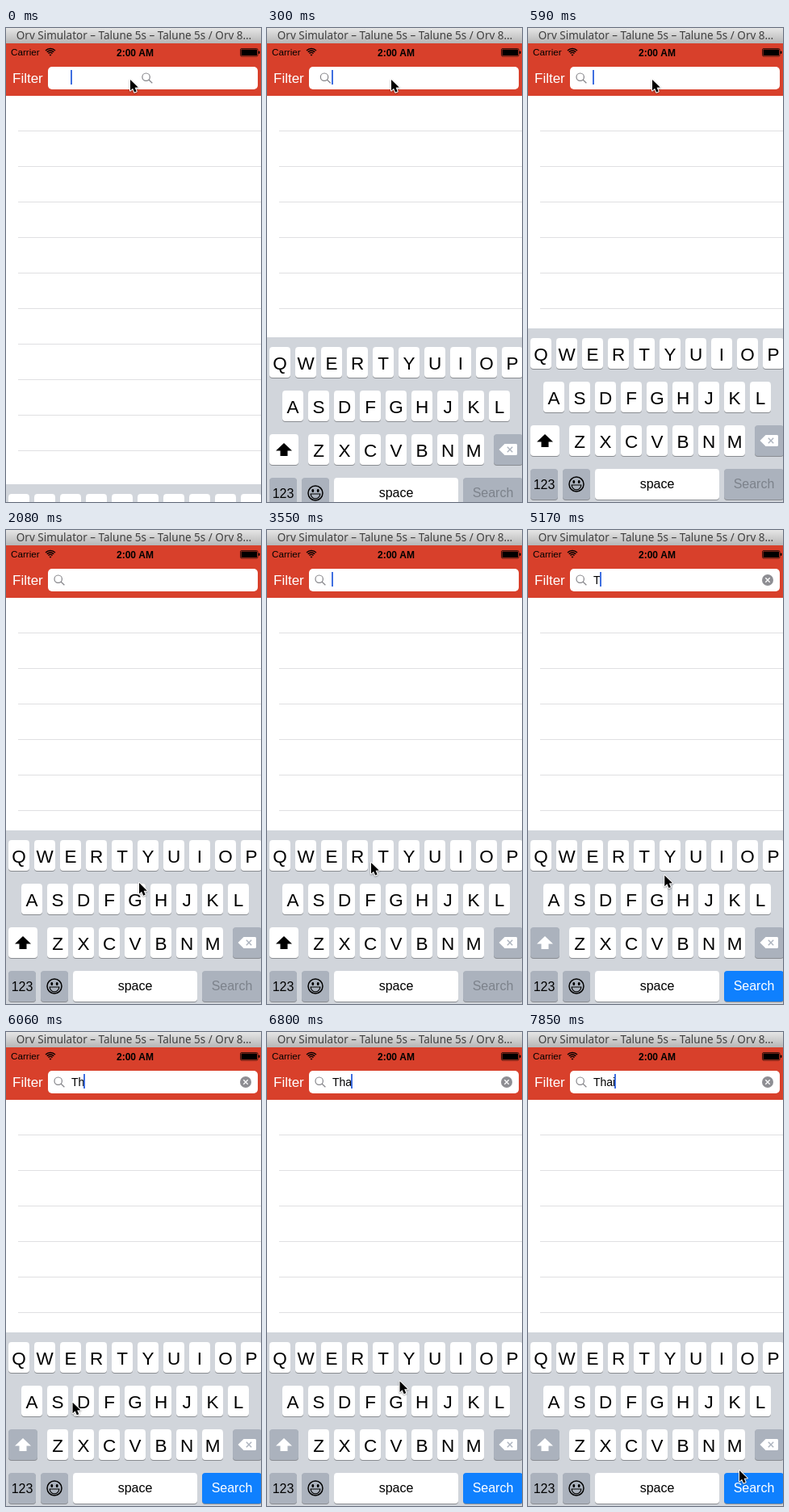
An HTML page with a canvas that plays this animation: 316 by 587 pixels, repeating every 8 s.

```html
<!DOCTYPE html>
<html lang="en">
<head>
<meta charset="utf-8">
<title>Search keyboard</title>
<style>
html, body { margin: 0; width: 100%; height: 100%; overflow: hidden; background: #fff; }
canvas { display: block; width: 316px; height: 587px; }
</style>
</head>
<body>
<canvas id="stage" width="316" height="587"></canvas>
<script>
const ctx = document.getElementById('stage').getContext('2d');
const W = 316, H = 587, LOOP = 8000, STEP = LOOP / 54;
const SANS = '"Liberation Sans", Arial, sans-serif';
const RED = '#d8402b', BOARD = '#d1d5db', GREY = '#abb2bd', BLUE = '#0f80fe';

// Key presses: letter typed, key, press and release times
const presses = [
  { out: 'T', key: 'T', down: 4425, up: 4575 },
  { out: 'h', key: 'H', down: 5420, up: 5590 },
  { out: 'a', key: 'A', down: 6130, up: 6290 },
  { out: 'i', key: 'I', down: 7090, up: 7260 }
];

// Pointer path: time, x, y
const path = [
  [0, 154, 64], [1030, 154, 64], [1180, 172, 300], [1330, 174, 403],
  [1500, 174, 403], [1640, 178, 420], [1900, 171, 446], [2075, 165, 437],
  [2660, 152, 446], [2960, 129, 450], [3120, 129, 450], [3550, 129, 412],
  [4290, 129, 412], [4440, 140, 408], [4740, 143, 409], [5170, 181, 436],
  [5450, 189, 458], [5620, 187, 458], [6080, 30, 459], [6260, 32, 459],
  [6510, 110, 445], [6800, 211, 422], [7050, 240, 406], [7290, 240, 408],
  [7700, 250, 513], [7850, 262, 543], [8000, 262, 543]
];

function pointerAt(t) {
  const i = Math.max(1, path.findIndex(p => p[0] > t));
  const [t0, x0, y0] = path[i - 1], [t1, x1, y1] = path[i];
  const k = (t - t0) / (t1 - t0);
  return [x0 + (x1 - x0) * k, y0 + (y1 - y0) * k];
}

// Remaining share of the critically damped entrance
function remaining(t) {
  const a = 14 * (t + 38) / 1000;
  return t > 560 ? 0 : (1 + a) * Math.exp(-a);
}

function box(x, y, w, h, r, color) {
  ctx.fillStyle = color;
  ctx.beginPath();
  ctx.roundRect(x, y, w, h, r);
  ctx.fill();
}

function text(s, x, y, size, color, align = 'center', weight = '', family = SANS) {
  ctx.font = `${weight} ${size}px ${family}`;
  ctx.textAlign = align;
  ctx.fillStyle = color;
  ctx.fillText(s, x, y);
}

function poly(points, color) {
  ctx.fillStyle = color;
  ctx.beginPath();
  points.forEach(([x, y]) => ctx.lineTo(x, y));
  ctx.closePath();
  ctx.fill();
}

function stroke(color, width, draw) {
  ctx.strokeStyle = color;
  ctx.lineWidth = width;
  ctx.beginPath();
  draw();
  ctx.stroke();
}

function cross(x, y, r, color, width) {
  stroke(color, width, () => {
    ctx.moveTo(x - r, y - r); ctx.lineTo(x + r, y + r);
    ctx.moveTo(x + r, y - r); ctx.lineTo(x - r, y + r);
  });
}

function titleBar() {
  const g = ctx.createLinearGradient(0, 0, 0, 19);
  g.addColorStop(0, '#e6e6e6');
  g.addColorStop(1, '#b6b6b6');
  ctx.fillStyle = g;
  ctx.fillRect(0, 0, W, 19);
  text('Orv Simulator – Talune 5s – Talune 5s / Orv 8…', 158.5, 14, 13.5,
    '#404040', 'center', '', '"Noto Sans", sans-serif');
}

function statusBar() {
  text('Carrier', 6, 34, 11.7, '#000', 'left');
  text('2:00 AM', 160, 34.5, 12, '#000', 'center', 'bold');
  for (const r of [3.6, 6, 8.4]) {
    stroke('#000', 1.5, () => ctx.arc(55, 34, r, -Math.PI * 0.75, -Math.PI * 0.25));
  }
  poly([[53.4, 32.7], [56.6, 32.7], [55, 34.7]], '#000');
  stroke('#000', 0.7, () => ctx.roundRect(290.5, 25.5, 21.5, 9.5, 1.5));
  box(291.5, 26.5, 19.5, 7.5, 0.5, '#000');
  box(312.8, 28.5, 1.6, 3.5, 0.8, '#000');
}

function searchBar(t, p) {
  text('Filter', 8, 68, 17, '#fff', 'left');
  box(52, 48, 260, 28, 5, '#fff');

  const x = 66 + 121 * p;
  stroke('#85858a', 1.2, () => {
    ctx.arc(x - 1.3, 60.7, 4.7, 0, 7);
    ctx.moveTo(x + 2.2, 64.2);
    ctx.lineTo(x + 6.4, 68.2);
  });

  const done = presses.filter(k => t >= k.up);
  const value = done.map(k => k.out).join('');
  text(value, 81, 67, 14, '#000', 'left');
  const since = t - (done.length ? done[done.length - 1].up + 200 : 250);
  if (since < 0 || since % 1000 < 550) {
    ctx.fillStyle = '#3f6fe0';
    ctx.fillRect(80 + Math.round(ctx.measureText(value).width), 52, 2, 18);
  }
  if (value) {
    box(290, 55, 14, 14, 7, '#8e8e93');
    cross(297, 62, 2.7, '#fff', 1.3);
  }
  return value;
}

function key(x, y, w, color) {
  box(x, y + 1, w, 38, 4, '#898c91');
  box(x, y, w, 38, 4, color);
}

function balloon(x, y, label) {
  ctx.save();
  ctx.shadowColor = 'rgba(0,0,0,.4)';
  ctx.shadowBlur = 3;
  ctx.fillStyle = '#fff';
  ctx.beginPath();
  ctx.moveTo(x, y + 34);
  ctx.lineTo(x, y + 9);
  ctx.bezierCurveTo(x, y - 1, x - 13, y - 1, x - 13, y - 13);
  ctx.lineTo(x - 13, y - 45);
  ctx.quadraticCurveTo(x - 13, y - 54, x - 4, y - 54);
  ctx.lineTo(x + 30, y - 54);
  ctx.quadraticCurveTo(x + 39, y - 54, x + 39, y - 45);
  ctx.lineTo(x + 39, y - 13);
  ctx.bezierCurveTo(x + 39, y - 1, x + 26, y - 1, x + 26, y + 9);
  ctx.lineTo(x + 26, y + 34);
  ctx.quadraticCurveTo(x + 26, y + 38, x + 22, y + 38);
  ctx.lineTo(x + 4, y + 38);
  ctx.quadraticCurveTo(x, y + 38, x, y + 34);
  ctx.fill();
  ctx.restore();
  text(label, x + 13, y - 15, 34, '#000');
}

function smiley(x, y) {
  stroke('#000', 1.5, () => ctx.arc(x, y, 9, 0, 7));
  box(x - 4.5, y - 5, 2.6, 4, 1.3, '#000');
  box(x + 1.9, y - 5, 2.6, 4, 1.3, '#000');
  stroke('#000', 1.2, () => {
    ctx.arc(x, y + 1, 5.8, 0, Math.PI);
    ctx.closePath();
  });
}

function keyboard(t, top, typed) {
  ctx.fillStyle = BOARD;
  ctx.fillRect(0, top, W, H - top);
  const rows = [['QWERTYUIOP', 3], ['ASDFGHJKL', 19], ['ZXCVBNM', 51]];
  const held = presses.find(k => t >= k.down && t < k.up);
  let pop;
  rows.forEach(([letters, left], r) => {
    const y = top + 12 + r * 54;
    [...letters].forEach((c, i) => {
      const x = left + i * 32;
      key(x, y, 26, '#fff');
      text(c, x + 13, y + 27.5, 22.5, '#000');
      if (held && held.key === c) pop = [x, y, c];
    });
  });

  const y3 = top + 120, y4 = top + 174;
  key(3, y3, 36, typed ? GREY : '#fff');
  poly([[21, y3 + 11], [31, y3 + 20.5], [25.5, y3 + 20.5], [25.5, y3 + 27],
    [16.5, y3 + 27], [16.5, y3 + 20.5], [11, y3 + 20.5]], typed ? '#fff' : '#000');

  key(281, y3, 36, GREY);
  poly([[287.5, y3 + 19], [294.5, y3 + 12], [309, y3 + 12], [310, y3 + 13],
    [310, y3 + 25], [309, y3 + 26], [294.5, y3 + 26]], '#fff');
  cross(301, y3 + 19, 3.2, GREY, 1.4);

  key(3, y4, 34, GREY);
  text('123', 20, y4 + 25, 16, '#000');
  key(43, y4, 34, GREY);
  smiley(60, y4 + 19);
  key(83, y4, 154, '#fff');
  text('space', 160, y4 + 24, 16, '#000');
  key(243, y4, 74, typed ? BLUE : GREY);
  text('Search', 280, y4 + 24, 16, typed ? '#fff' : '#7c828b');
  if (pop) balloon(...pop);
}

function pointer([x, y]) {
  const shape = [[0, 0], [0, 13.5], [3.1, 10.7], [5.2, 15.6], [7.7, 14.5], [5.6, 9.8], [9.8, 9.6]]
    .map(([a, b]) => [x + a, y + b]);
  ctx.save();
  ctx.lineJoin = 'round';
  ctx.shadowColor = 'rgba(0,0,0,.35)';
  ctx.shadowBlur = 2;
  ctx.shadowOffsetY = 1;
  stroke('#fff', 2, () => {
    shape.forEach(p => ctx.lineTo(...p));
    ctx.closePath();
  });
  ctx.restore();
  poly(shape, '#000');
}

function draw(now) {
  const t = Math.floor(((now % LOOP) + 12) / STEP) * STEP % LOOP;
  const p = remaining(t);
  ctx.fillStyle = '#fff';
  ctx.fillRect(0, 0, W, H);
  ctx.fillStyle = '#e0e0e2';
  for (let y = 127; y < H; y += 44) ctx.fillRect(15, y, W, 1);
  ctx.fillStyle = RED;
  ctx.fillRect(0, 19, W, 65);
  titleBar();
  statusBar();
  const value = searchBar(t, p);
  keyboard(t, Math.round(372 + 215 * p), value !== '');
  pointer(pointerAt(t));
}

const start = performance.now();
function frame() {
  draw(performance.now() - start);
  requestAnimationFrame(frame);
}
frame();
</script>
</body>
</html>
```
